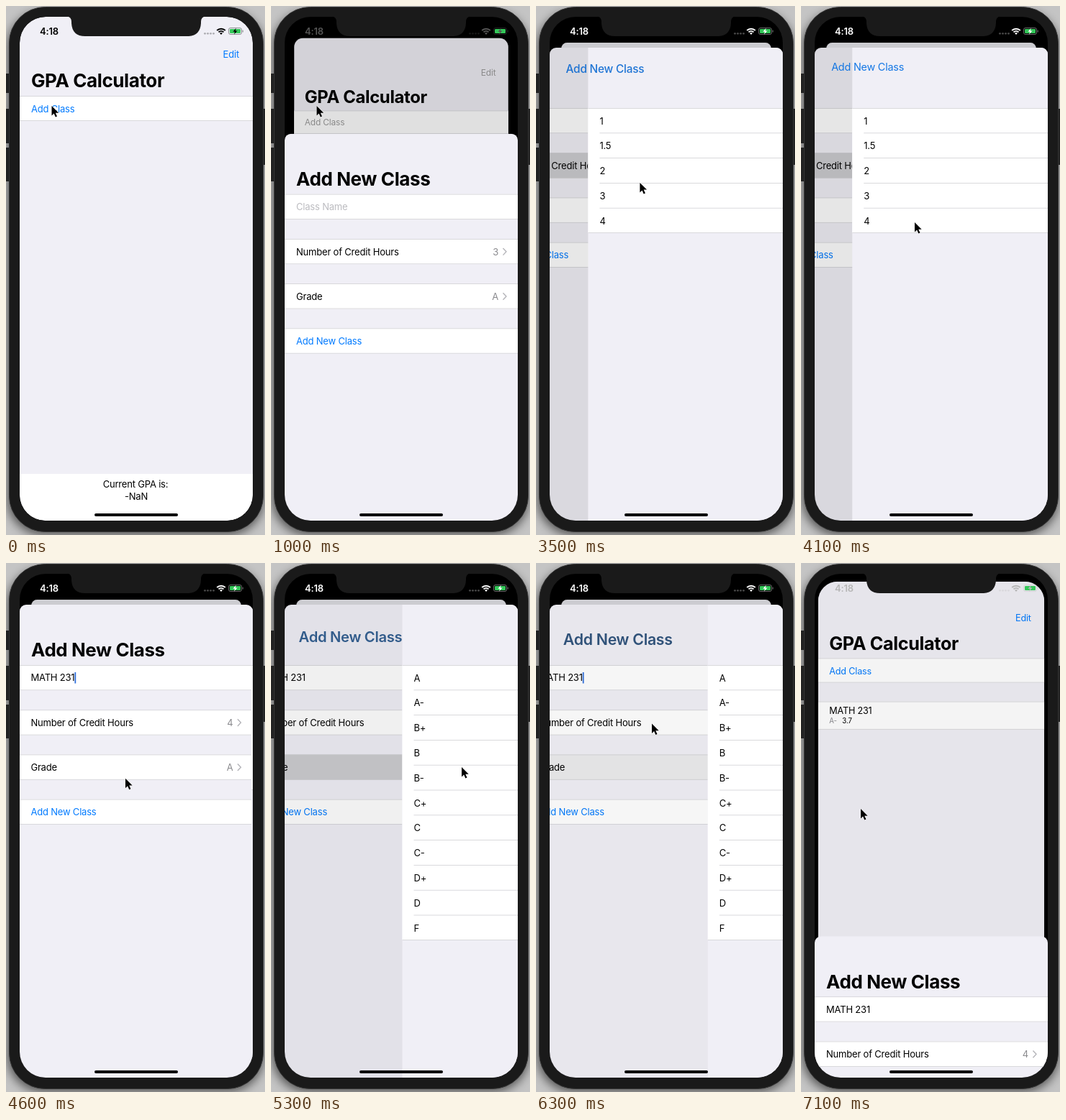
Animation of 360x736 px, one loop 7.2 s. Source, as an HTML page:

```html
<!DOCTYPE html>
<html lang="en">
<head>
<meta charset="utf-8">
<title>GPA Calculator</title>
<style>
html, body { margin: 0; width: 100%; height: 100%; overflow: hidden; background: #c4c4c4; }
svg { display: block; width: 360px; height: 736px; }
text { font: 13px Inter, Roboto, sans-serif; letter-spacing: -.015em; white-space: pre; }
.title { font-size: 26px; font-weight: 700; }
.clock { font-weight: 600; }
.small { font-size: 10px; }
</style>
</head>
<body>
<svg viewBox="0 0 360 736">
  <defs>
    <clipPath id="screen"><rect x="19" y="15" width="324" height="701" rx="36"/></clipPath>
    <clipPath id="sheet"><rect x="19" y="58" width="324" height="680" rx="9"/></clipPath>
    <filter id="blur"><feGaussianBlur stdDeviation="7"/></filter>
  </defs>
  <rect x="2" y="8" width="356" height="728" rx="50" opacity=".58" filter="url(#blur)"/>
  <path d="M0 94h6v27H0zM0 143h6v48H0zM0 197h6v47H0zM356 143h4v78h-4z" fill="#222"/>
  <rect x="4.5" y="1.5" width="353" height="730" rx="50" fill="#1a1a1a" stroke="#333"/>
  <g id="stage" clip-path="url(#screen)"></g>
  <path d="M84 14Q91 15 91 22V24Q92 42 110 42H252Q270 42 271 24V22Q271 15 278 14Z" fill="#1a1a1a"/>
  <rect x="123" y="706" width="116" height="4" rx="2"/>
  <path id="cursor" d="M0 0V13.5L3.1 10.5 5.3 15.5 7.5 14.5 5.3 9.7H9.7Z" stroke="#fff" stroke-width="1" paint-order="stroke"/>
</svg>
<script>
const LOOP = 7200, STEP = 100;
const BLUE = '#007aff', GRAY = '#8a8a8e', BG = '#f0eff6', LINE = '#d0d0d4';
const HOURS = ['1', '1.5', '2', '3', '4'];
const GRADES = ['A', 'A-', 'B+', 'B', 'B-', 'C+', 'C', 'C-', 'D+', 'D', 'F'];

// Start and end of each transition, in ms
const SHEET = [760, 6912], HOURS_NAV = [3250, 4045], GRADE_NAV = [5172, 6120];
// When each character of the class name is typed
const NAME = 'MATH 231', KEYS = [1900, 2000, 2200, 2300, 2500, 2600, 2700, 2900];
// Pointer path: time, x, y
const POINTER = [
  [0, 63.5, 139], [1200, 63.5, 139], [1500, 85.5, 154.5], [2800, 85.5, 154.5],
  [3100, 137, 216], [3300, 137, 216], [3800, 158, 301], [4500, 158, 301],
  [5100, 265, 284], [5400, 265, 284], [5800, 175, 196], [6100, 175, 196],
  [6300, 161, 223.5], [6600, 83, 342], [LOOP, 83, 342]
];

const clamp = v => Math.max(0, Math.min(1, v));
const mix = (a, b, k) => a + (b - a) * k;
const spring = ms => { const x = Math.max(0, ms) * .013; return 1 - (1 + x) * Math.exp(-x); };
const shown = (t, [start, end]) => spring(t - start) - spring(t - end);

const pen = document.createElement('canvas').getContext('2d');
pen.font = '13px Inter, Roboto, sans-serif';
const widthOf = s => pen.measureText(s).width - .195 * s.length;

const rect = (x, y, w, h, fill, extra = '') =>
  `<rect x="${x}" y="${y}" width="${w}" height="${h}" fill="${fill}" ${extra}/>`;
const text = (x, y, s, fill = '#000', extra = '') =>
  `<text x="${x}" y="${y}" fill="${fill}" ${extra}>${s}</text>`;
const group = (transform, body) => `<g transform="${transform}">${body}</g>`;
const section = (x, y, h, highlight = 0) =>
  rect(x, y, 324, h, '#fff') +
  rect(x, y, 324, h, '#cdcdd0', `opacity="${highlight}"`) +
  rect(x, y, 324, .8, LINE) + rect(x, y + h - .8, 324, .8, LINE);

function home(t) {
  const tint = t > 850 && t < 5000 ? '#9c9c9c' : BLUE;
  let out = rect(19, 15, 324, 701, BG) +
    text(324, 72, 'Edit', tint, 'text-anchor="end"') +
    text(35, 113, 'GPA Calculator', '#000', 'class="title"') +
    section(19, 125, 35) + text(35, 147.7, 'Add Class', tint) +
    rect(19, 651, 324, 65, '#fff') +
    text(180, 670.3, 'Current GPA is:', '#000', 'text-anchor="middle"') +
    text(181, 686.5, '-NaN', '#000', 'text-anchor="middle"');
  if (t > 5000) out += section(19, 187, 40.2) + text(35, 205, NAME) +
    text(35, 218.7, 'A-', GRAY, 'class="small"') +
    text(53.5, 218.7, '3.7', '#000', 'class="small"');
  return out;
}

function detail(y, value) {
  return text(316, y, value, GRAY, 'text-anchor="end"') +
    `<path d="M322.5 ${y - 9.5}l4.5 4.8-4.5 4.8" fill="none" stroke="#b4b4b9" stroke-width="1.4"/>`;
}

function form(t, hours, grade) {
  const highlight = ([start, end], k) => t < end ? +(t >= start - 50) : clamp(k * 1.25);
  const typed = NAME.slice(0, KEYS.filter(k => k <= t).length);
  const caret = t >= 1700 && t < 5000 || t >= 6200 && t < 6800;
  return section(19, 142, 35.2) +
    (typed ? text(35, 164.3, typed) : text(35, 164.3, 'Class Name', '#bcbcc0')) +
    (caret ? rect(35 + widthOf(typed), 152, 1.8, 15.5, '#2f6fdc') : '') +
    section(19, 204.3, 35.2, highlight(HOURS_NAV, hours)) +
    text(35, 226.8, 'Number of Credit Hours') + detail(226.8, t < HOURS_NAV[1] ? 3 : 4) +
    section(19, 266.5, 35.2, highlight(GRADE_NAV, grade)) +
    text(35, 289, 'Grade') + detail(289, t < GRADE_NAV[1] ? 'A' : 'A-') +
    section(19, 328.7, 35.2) + text(35, 351.4, 'Add New Class', BLUE);
}

function picker(items) {
  const h = 34.8;
  return rect(0, 58, 324, 658, BG) + section(0, 142, h * items.length) +
    items.map((s, i) => text(16, 164.5 + i * h, s) +
      (i ? rect(16, 142 + i * h - .4, 308, .8, LINE) : '')).join('');
}

// Large title that shrinks into the back button
function heading(k) {
  const size = mix(26, 13, k), x = mix(35, 43, k), y = mix(121, 80, k);
  const fill = `rgb(0,${122 * k},${255 * k})`, fade = 1 - .9 * k * (1 - k);
  return text(x, y + size * .36, 'Add New Class', fill,
    `style="font-size:${size}px;font-weight:${mix(700, 400, k)}" opacity="${fade}"`) +
    `<path d="M36 73l-6.5 7 6.5 7" fill="none" stroke="${BLUE}" stroke-width="2" opacity="${clamp((k - .9) * 10)}"/>`;
}

function sheet(t) {
  const hours = shown(t, HOURS_NAV), grade = shown(t, GRADE_NAV), k = clamp(hours + grade);
  const lagged = clamp(shown(t - 12, HOURS_NAV) + shown(t - 12, GRADE_NAV));
  return '<g clip-path="url(#sheet)">' + rect(19, 58, 324, 680, BG) +
    group(`translate(${-97 * k})`, form(t, hours, grade)) +
    rect(19, 58, 324, 680, '#000', `opacity="${.115 * k}"`) +
    (k > .001 ? group(`translate(${343 - 324 * k})`, picker(t < 4900 ? HOURS : GRADES)) : '') +
    heading(lagged) + '</g>';
}

function statusBar(t) {
  const v = Math.round(255 * (clamp((t - 900) / 300) - clamp((t - 7000) / 350)));
  const ink = `rgb(${v},${v},${v})`;
  const dots = [276.5, 280.5, 284.5, 288.5].map(x =>
    `<circle cx="${x}" cy="38.3" r="1.4" fill="${ink}" opacity=".28"/>`).join('');
  const arc = (r, w) => `<path d="M${299 - r * .7} ${40 - r * .72}a${r} ${r} 0 0 1 ${r * 1.4} 0" fill="none" stroke="${ink}" stroke-width="${w}"/>`;
  return text(47, 39.7, '4:18', ink, 'class="clock"') + dots +
    arc(8.3, 2) + arc(5, 1.9) + `<path d="M299 40l-2-2.2q2-1.7 4 0z" fill="${ink}"/>` +
    `<rect x="309.5" y="30.5" width="18" height="9" rx="2.5" fill="none" stroke="${ink}" opacity=".4"/>` +
    rect(311, 32, 15, 6, '#34c759', 'rx="1.3"') +
    rect(328.6, 33.5, 1.2, 3, ink, 'rx=".6" opacity=".4"') +
    `<path d="M319.8 30.8l-4.3 4.9h2.6l-1 3.8 4.4-5h-2.7z" fill="${ink}"/>`;
}

function pointerAt(t) {
  const i = POINTER.findIndex(p => p[0] > t);
  const [t0, x0, y0] = POINTER[i - 1], [t1, x1, y1] = POINTER[i];
  const u = (t - t0) / (t1 - t0), k = u * u * (3 - 2 * u);
  return `translate(${mix(x0, x1, k)} ${mix(y0, y1, k)})`;
}

const stage = document.getElementById('stage'), cursor = document.getElementById('cursor');

function draw(t) {
  const p = shown(t, SHEET), scale = 1 - .099 * p, top = 15 + 36 * p;
  const radius = mix(36, 9, p);
  stage.innerHTML =
    rect(19, 15, 324, 701, '#000') +
    group(`translate(181 ${top}) scale(${scale}) translate(-181 -15)`,
      `<g style="clip-path:inset(0 round ${radius}px)">` + home(t) +
      rect(19, 15, 324, 701, '#000', `opacity="${.15 * p}"`) + '</g>') +
    statusBar(t) +
    (p > 0 ? group(`translate(0 ${658 * (1 - p)})`, sheet(t)) : '');
  cursor.setAttribute('transform', pointerAt(t));
}

let last = -1;
function tick() {
  const t = Math.floor(performance.now() % LOOP / STEP) * STEP;
  if (t !== last) draw(last = t);
  requestAnimationFrame(tick);
}
tick();
</script>
</body>
</html>
```
